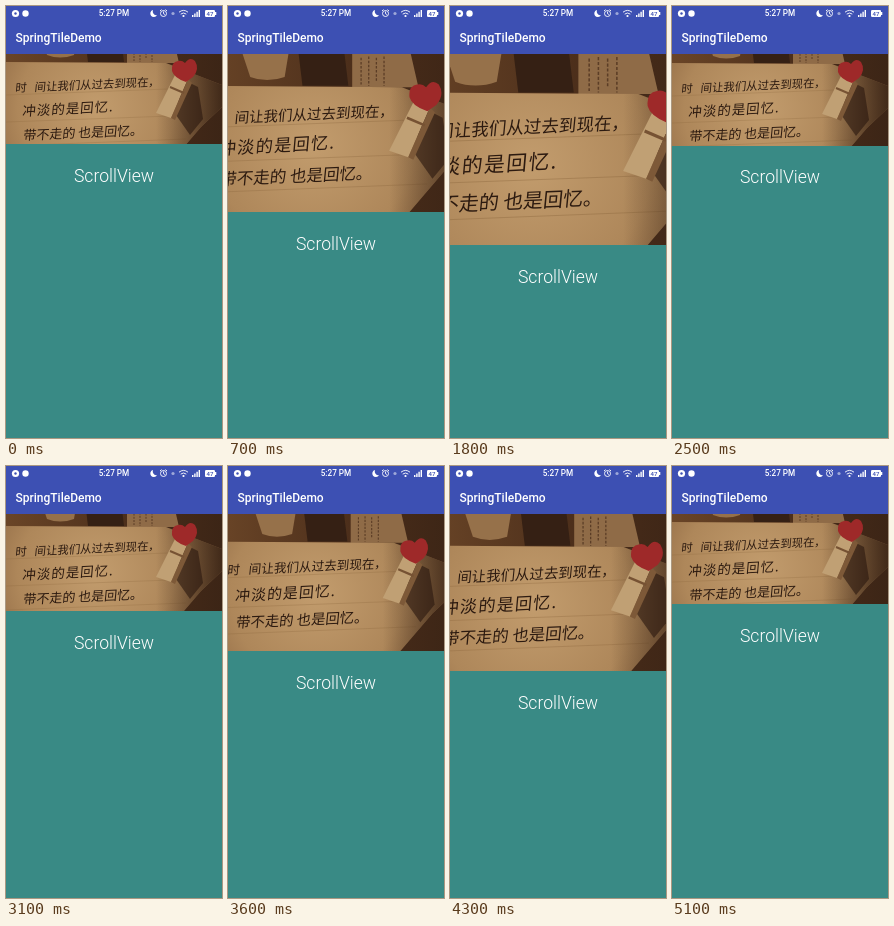
Animation, 216 px wide and 432 px high, one loop 5200 ms. Source, as an HTML page:

```html
<!DOCTYPE html>
<html lang="en">
<head>
<meta charset="utf-8">
<title>Pull to zoom</title>
<style>
html, body { margin: 0; width: 100%; height: 100%; overflow: hidden; background: #398a85; }
#bar, #photo, #label { position: absolute; left: 0; width: 216px; }
#bar { top: 0; height: 48px; }
#photo { top: 48px; overflow: hidden; background: #3a2416; }
#photo svg { position: absolute; }
#label { top: 0; text-align: center; color: #fff; font: 300 17.6px/20px Roboto, sans-serif; }
.hand { font: 500 12px "Noto Sans CJK SC", "Noto Sans CJK JP", sans-serif; fill: #2c1a10; }
</style>
</head>
<body>
<svg id="bar" viewBox="0 0 216 48" fill="#fff" font-family="Roboto, sans-serif">
  <rect width="216" height="48" fill="#3d50b3"/>
  <circle cx="9.5" cy="7.5" r="3.6"/>
  <circle cx="9.5" cy="7.5" r="1.2" fill="#3d50b3"/>
  <circle cx="19.5" cy="7.5" r="3.2"/>
  <text x="108" y="10.4" font-size="8.2" font-weight="500" text-anchor="middle">5:27 PM</text>
  <path d="M147 4a3.6 3.6 0 1 0 4 5.3A3.9 3.9 0 0 1 147 4z"/>
  <g fill="none" stroke="#fff" stroke-width=".9">
    <circle cx="157.5" cy="7.5" r="3"/>
    <path d="M157.5 5.5v2.2l1.4 .8M154 5l1.5-1.5M161 5l-1.5-1.5"/>
    <path d="M173 6.2q4.5-3.6 9 0M174.7 8.1q2.8-2.2 5.6 0"/>
  </g>
  <circle cx="167" cy="7.5" r="1.6" opacity=".5"/>
  <circle cx="177.5" cy="10" r="1.1"/>
  <path d="M186 11v-2h1.4v2zM188.2 11V7.5h1.4V11zM190.4 11V5.800h1.400V11zM192.600 11V4h1.400v7zM209 6h1.300v3H209z"/>
  <rect x="199" y="4" width="10" height="7" rx="1.2"/>
  <text x="204" y="9.7" font-size="6" font-weight="500" text-anchor="middle" fill="#3d50b3">47</text>
  <text x="9.5" y="35.8" font-size="12" font-weight="500">SpringTileDemo</text>
</svg>

<div id="photo">
  <svg viewBox="0 0 216 124">
    <defs>
      <radialGradient id="paper" gradientUnits="userSpaceOnUse" cx="90" cy="72" r="130">
        <stop offset="0" stop-color="#c29c6d"/>
        <stop offset=".6" stop-color="#ae875a"/>
        <stop offset="1" stop-color="#8a6440"/>
      </radialGradient>
      <linearGradient id="desk">
        <stop offset="0" stop-color="#6a4527"/>
        <stop offset=".6" stop-color="#4a2d1a"/>
        <stop offset="1" stop-color="#3c2516"/>
      </linearGradient>
      <linearGradient id="shade" gradientUnits="userSpaceOnUse" x1="150" x2="216">
        <stop offset="0" stop-color="#28160c" stop-opacity="0"/>
        <stop offset="1" stop-color="#28160c" stop-opacity=".75"/>
      </linearGradient>
    </defs>
    <rect width="216" height="124" fill="url(#desk)"/>
    <path d="M35 0h36l-3 18q-14 5-27 0z" fill="#96714a"/>
    <path d="M79 0h36l3 25H82z" fill="#352014"/>
    <path d="M121 0h46l6 26h-52z" fill="#8f6b47"/>
    <path d="M128 3v21M134 2v23M140 3v18M146 2v23" stroke="#5b3d26" stroke-dasharray="2 1.2"/>
    <path d="M0 25L160 26 216 48V70L195 90 166 124H0z" fill="url(#paper)"/>
    <path d="M0 58L162 52M0 85L165 79M0 109L180 102" stroke="#8d683f" stroke-width=".5" opacity=".55"/>
    <path d="M150 26h10l56 22v22L195 90 166 124H150z" fill="url(#shade)"/>
    <path d="M176 42L192 50 197 82 184 98 170 78z" fill="#28170e" opacity=".6"/>
    <path d="M170 36L182 42 165 81 150 76z" fill="#c0a074"/>
    <path d="M182 42L186 46 169 83 165 81z" fill="#7d5938"/>
    <path d="M164 50L178 56" stroke="#765233" stroke-width="2"/>
    <path transform="translate(-2 -4)" d="M181 30q5-7 10-2q5 8-2 16l-7 5q-12-4-14-11q-1-9 6-10q4-1 7 2z" fill="#9e2929"/>
    <text class="hand" transform="translate(9 55) rotate(-2.5) skewX(-8)" style="font-size:11.4px">时<tspan dx="8">间让我们从过去到现在，</tspan></text>
    <text class="hand" transform="translate(16 79) rotate(-3) skewX(-8)" style="font-size:13.5px;letter-spacing:1px">冲淡的是回忆.</text>
    <text class="hand" transform="translate(17 103) rotate(-2.5) skewX(-8)" style="font-size:13px">带不走的 也是回忆。</text>
  </svg>
</div>
<div id="label">ScrollView</div>

<script>
const LOOP = 5200, STEP = 100, TOP = 48, WIDTH = 216, NATURAL = 124;
// [time, bottom edge of the photo]: two drags, each followed by a spring back
const pull = [
  [0, 138], [100, 142], [600, 198], [700, 206], [1200, 221], [1800, 239],
  [1950, 239], [2050, 222], [2200, 170], [2350, 143], [2500, 139.5],
  [2900, 139], [3100, 145], [3600, 185], [4100, 253], [4200, 246],
  [4300, 205], [4450, 145], [4600, 138], [LOOP, 138]
];
const photo = document.getElementById('photo');
const picture = photo.firstElementChild;
const label = document.getElementById('label');

function edgeAt(t) {
  const i = pull.findIndex(p => p[0] > t);
  const [t0, y0] = pull[i - 1], [t1, y1] = pull[i];
  return y0 + (y1 - y0) * (t - t0) / (t1 - t0);
}

function draw(now) {
  const t = Math.floor(now % LOOP / STEP) * STEP;
  const edge = edgeAt(t), height = edge - TOP;
  const scale = Math.max(1, height / NATURAL);
  const w = WIDTH * scale, h = NATURAL * scale;
  photo.style.height = height + 'px';
  Object.assign(picture.style, {
    width: w + 'px', height: h + 'px',
    left: (WIDTH - w) / 2 + 'px', top: (height - h) / 2 + 'px'
  });
  label.style.transform = `translateY(${edge + 21.5}px)`;
}

const start = performance.now();
function tick() {
  draw(performance.now() - start);
  requestAnimationFrame(tick);
}
tick();
</script>
</body>
</html>
```
